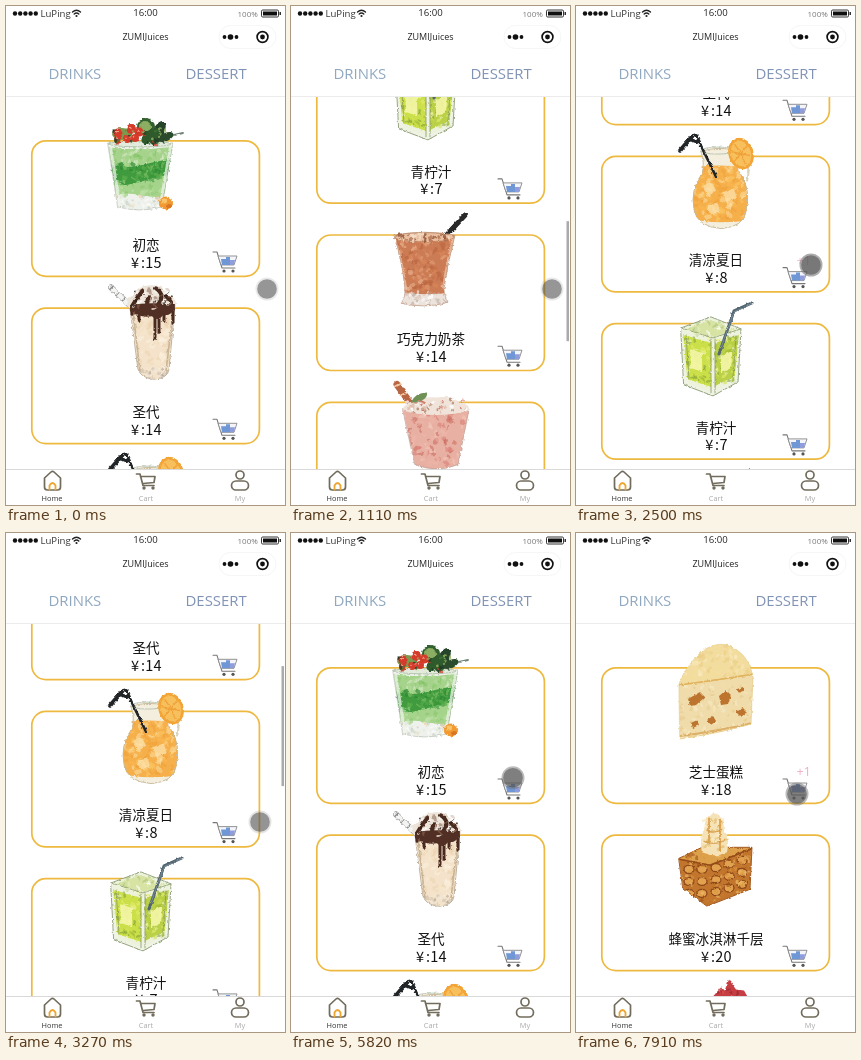
An HTML page that plays this animation: 279x499 px, repeating every 8 s.

```html
<!DOCTYPE html>
<html lang="zh">
<head>
<meta charset="utf-8">
<title>Drinks menu</title>
<style>
html, body { margin: 0; width: 100%; height: 100%; overflow: hidden; background: #fff; }
svg { display: block; width: 279px; height: 499px; }
text { font-family: "Open Sans", "Noto Sans CJK SC", "Noto Sans CJK", sans-serif; }
.name, .price { font-family: "Noto Sans CJK SC", "Noto Sans CJK", sans-serif; text-anchor: middle; fill: #111; }
.name { font-size: 13.6px; }
.price { font-size: 14.5px; letter-spacing: .3px; }
.yen { font-weight: 500; }
.tab { font-size: 14.9px; }
.label { font-size: 7.4px; text-anchor: middle; fill: #aaa; }
.icon { fill: none; stroke: #716c5c; stroke-width: 1.7; stroke-linejoin: round; stroke-linecap: round; }
</style>
</head>
<body>
<svg id="stage" viewBox="0 0 279 499"></svg>
<script>
const GAP = 167.3, TOP = 134, LOOP = 8000;

let seed = 7;
const rnd = () => (seed = (seed * 16807) % 2147483647) / 2147483647;
const between = (a, b) => a + (b - a) * rnd();

// drawing helpers
const shape = (d, fill, extra = '') => `<path d="${d}" fill="${fill}" ${extra}/>`;
const line = (d, color, width, extra = '') =>
  `<path d="${d}" fill="none" stroke="${color}" stroke-width="${width}" stroke-linecap="round" stroke-linejoin="round" ${extra}/>`;
const oval = (x, y, rx, ry, fill, extra = '') =>
  `<ellipse cx="${x}" cy="${y}" rx="${rx}" ry="${ry}" fill="${fill}" ${extra}/>`;
const clip = (id, d, inner) =>
  `<clipPath id="${id}"><path d="${d}"/></clipPath><g clip-path="url(#${id})">${inner}</g>`;
const dabs = (n, x, y, w, h, colors, r = 2, alpha = .55) => {
  let out = '';
  for (let i = 0; i < n; i++) {
    const cx = between(x, x + w).toFixed(1), cy = between(y, y + h).toFixed(1);
    out += oval(cx, cy, between(r * .5, r * 1.5).toFixed(1), between(r * .3, r).toFixed(1),
      colors[Math.floor(rnd() * colors.length)],
      `opacity="${alpha}" transform="rotate(${Math.floor(rnd() * 180)} ${cx} ${cy})"`);
  }
  return out;
};

// pictures: x on the stage, y from the top edge of the card
function greenSoda() {
  const glass = 'M102 3L167 3L156 67Q134 73 112 67Z';
  return line('M158 0L168 -5L177 -7', '#6f8578', 1.8) +
    clip('soda', glass,
      shape('M100 0H170V75H100Z', '#eff2ec') +
      shape('M100 7Q134 12 170 6V55Q150 59 134 55T100 57Z', '#a5d38b') +
      dabs(50, 104, 6, 60, 20, ['#b9dca0', '#7fbf61', '#dcebcf', '#8fc973'], 2.2) +
      shape('M100 23Q118 30 136 25T170 19V34Q150 36 134 42T100 43Z', '#3f9b3e') +
      dabs(55, 104, 24, 58, 16, ['#2b8433', '#5cae4d', '#37963a', '#80c267'], 2.4, .6) +
      dabs(40, 107, 41, 54, 14, ['#c4e3ad', '#8bc76c', '#a7d78c'], 2.4) +
      dabs(50, 110, 56, 48, 14, ['#fff', '#c5ccc2', '#e0e8da', '#f0c690'], 2) +
      line('M104 4L114 67M165 4L154 67', '#f0f5ec', 3, 'opacity=".75"')) +
    line(glass, '#a5b1a3', .8, 'opacity=".7"') +
    oval(134, 4, 31, 2.8, '#e3ecdc', 'stroke="#a9bba2" stroke-width=".8"') +
    oval(116, -6, 10, 6, '#7b9a4d') + oval(140, -13, 9, 9, '#33602f') + oval(139, -13, 6, 6, '#8bae62') +
    oval(152, -7, 6, 13, '#25442a', 'transform="rotate(25 152 -7)"') +
    oval(145, -4, 11, 6, '#2e5a2c', 'transform="rotate(-35 145 -4)"') +
    oval(160, -3, 8, 4, '#2b4b2d', 'transform="rotate(-25 160 -3)"') +
    [[112, -7, 4.5], [121, -1, 4], [125, -11, 5], [133, -8, 4.5], [129, -2, 4], [112, 0, 3.5]]
      .map(([x, y, r]) => oval(x, y, r, r, '#d43b2a') + oval(x - 1, y - 1.3, 1.2, 1, '#f4a08a')).join('') +
    dabs(34, 107, -12, 53, 17, ['#1c3a20', '#3e7936', '#9dbb6a', '#c93a2a'], 1.6, .75) +
    oval(160, 63, 7, 6.5, '#f19a32') + oval(158, 61, 3, 2.5, '#f9c56a') + oval(163, 66, 3, 2, '#dc7524');
}

function sundae() {
  const cup = 'M124 -2Q146 -8 169 -2L163 62Q162 71 148 72Q135 71 132 62Z';
  return line('M105 -20L126 0', '#a9a9a9', 6) + line('M105 -20L126 0', '#f4f4f2', 4.4) +
    line('M104 -18l3 -3M110 -12l3 -3M116 -6l3 -3', '#8d8d8d', 1.6) +
    clip('sundae', cup,
      shape('M120 -14H172V76H120Z', '#f4e3ca') +
      dabs(70, 126, 8, 41, 56, ['#fdf4e4', '#ebd2ad', '#f8e7cd', '#f0d9b8'], 3, .5) +
      dabs(24, 131, 61, 33, 11, ['#c7baa8', '#eee8df', '#a99d8d'], 2.2) +
      line('M127 4L134 64M167 4L160 64', '#c9b497', 1.6)) +
    line(cup, '#b3a48f', .8) +
    shape('M122 0Q119 -8 127 -12Q131 -22 144 -22Q157 -23 160 -14Q171 -10 170 0Q148 8 122 0Z', '#ede4da') +
    dabs(30, 126, -19, 39, 18, ['#c9baa8', '#fff', '#fff', '#8a6c57'], 2.4) +
    line('M137 -17Q131 -10 126 -1M150 -19Q160 -12 152 -3M143 -10Q138 -2 146 3M160 -11Q167 -5 167 2', '#4a2b20', 4) +
    line('M126 0V7M133 2V13M149 2V31M153 2V25M158 2V14M167 0V16', '#4a2a20', 3) +
    shape('M124 -2Q146 -6 169 -2Q167 9 157 8Q151 15 146 9Q134 11 124 4Z', '#512f24') +
    dabs(28, 126, -16, 40, 25, ['#30190f', '#7d5743', '#eee3d8'], 1.6, .8);
}

function orangePitcher() {
  const jug = 'M125 -4Q140 -10 160 -5Q158 10 165 19Q175 34 170 56Q168 71 145 73Q121 71 118 54Q114 34 126 18Q129 8 125 -4Z';
  return clip('jug', jug,
      shape('M112 -14H178V76H112Z', '#f3eedd') +
      shape('M112 13Q140 7 178 13V64Q146 70 112 63Z', '#f6b04b') +
      dabs(120, 117, 13, 55, 51, ['#fbc865', '#ef9f38', '#f9b853', '#fee1a4'], 2.8, .55) +
      shape('M126 31l9 -5 5 9 -8 6ZM146 37l12 -4 3 10 -11 3ZM131 50l11 -2 2 9 -10 2Z', '#fce2ab', 'opacity=".75"')) +
    line(jug, '#c6b796', .9) + oval(142, -5, 17, 3.5, 'none', 'stroke="#bec8b8"') +
    line('M160 5Q177 6 171 25', '#d9d3bd', 2) +
    oval(165, -2, 12.5, 16, '#f2a536', 'transform="rotate(-18 165 -2)"') +
    oval(165, -2, 10, 13, '#f8bf5d', 'transform="rotate(-18 165 -2)"') +
    line('M165 -2l-6 -9M165 -2l6 -8M165 -2l9 2M165 -2l4 10M165 -2l-7 8M165 -2l-10 -2', '#f0a239', 1.3) +
    line('M104 -5L116 -19', '#222527', 4.2) +
    line('M115 -18Q119 -24 123 -17Q121 -12 116 -15M122 -16L140 21', '#222527', 2.6);
}

function limeGlass() {
  const cube = 'M105 5L135 -6L165 6L162 59L137 73L108 62Z';
  return clip('lime', cube,
      shape('M100 -10H170V76H100Z', '#edf2dc') +
      shape('M107 12L135 20V64L111 56Z', '#cbdf49') +
      shape('M139 20L163 12L159 53L139 63Z', '#b9d047') +
      shape('M110 6L135 -3L160 7L137 14Z', '#d6e3a3') +
      dabs(110, 107, 14, 56, 45, ['#e6ee6e', '#a3bd36', '#d3e255', '#f4f7bf', '#83a238'], 2.2, .6) +
      dabs(30, 110, -3, 52, 15, ['#fff', '#a9c06f', '#e6efc2'], 2.2) +
      shape('M114 26L126 30V49L115 45ZM145 33L156 28L155 45L145 50Z', '#f6f7a8', 'opacity=".9"') +
      line('M105 7L110 60M165 8L160 58M137 15V71M108 61L137 71L162 58', '#f0f4e5', 3.4, 'opacity=".85"')) +
    line(cube, '#8c9b77', .9) + line('M105 5L137 15L165 6M135 16V70M139 16V70M110 12L113 56M160 13L157 54', '#869863', .8) +
    line('M143 31L158 -12L176 -20', '#536672', 3) + line('M145 25L158 -11L175 -19', '#8296a0', .8);
}

function chocolateTea() {
  const cup = 'M103 1Q134 -5 164 1Q157 28 153 54Q153 62 157 68Q134 75 110 69Q115 62 114 55Q111 26 103 1Z';
  return line('M151 5L175 -20', '#292929', 4) + line('M160 -4L174 -19', '#292929', 5) +
    clip('choco', cup,
      shape('M100 -5H168V76H100Z', '#cc7c55') +
      dabs(130, 104, 5, 59, 50, ['#e5a27a', '#b5603d', '#da875c', '#eebd9b', '#c46c43'], 2.6) +
      shape('M100 57Q135 63 168 57V76H100Z', '#ece3dc') +
      dabs(36, 111, 58, 47, 13, ['#fff', '#b9a99f', '#d8c0b1'], 2) +
      line('M104 5Q112 30 115 54M162 5Q155 30 152 54', '#efc9ae', 2, 'opacity=".7"')) +
    line(cup, '#c0a18d', .7) + oval(133.5, 3, 29.500, 4.5, '#eabf9f', 'stroke="#bd8967" stroke-width=".8"') +
    dabs(34, 108, 0, 50, 6, ['#ad6a48', '#f4dfca', '#85492f'], 2, .75);
}

function berryShake() {
  const cup = 'M112 8Q145 0 178 8L167 63Q146 72 124 63Z';
  return line('M106 -17L126 11', '#b76542', 7) + line('M104 -15l6 -3M110 -6l6 -3M117 4l6 -3', '#efc7a4', 2) +
    clip('berry', cup, shape('M108 -4H182V76H108Z', '#e7b0a2') +
      dabs(100, 114, 8, 60, 55, ['#f4cabe', '#d97b73', '#efb7aa', '#c9685c'], 2.6)) +
    line(cup, '#c2a298', .8) +
    shape('M112 9Q111 3 122 1Q131 -5 145 -4Q162 -6 168 1Q180 3 178 9Q145 18 112 9Z', '#f0e3d9') +
    dabs(44, 115, -2, 60, 13, ['#c85e4b', '#fff', '#ae8067', '#dfb7a6'], 1.8, .75) +
    shape('M120 1Q124 -9 136 -9Q137 0 120 1Z', '#6f9155');
}

function cheesecake() {
  const cake = 'M103 17Q108 1 126 -16Q140 -25 151 -22Q172 -15 177 9L175 57Q150 65 104 72Z';
  return clip('cheese', cake,
      shape('M100 -26H180V76H100Z', '#f2dc9e') +
      shape('M100 17Q136 13 180 6V76H100Z', '#f0dcaa') +
      dabs(110, 103, -22, 74, 32, ['#fbeec5', '#ecce86', '#f5e0a2'], 2.6, .5) +
      dabs(110, 103, 18, 74, 52, ['#f9edcc', '#e4c587', '#f3dfab'], 2.2, .5) +
      line('M103 18Q136 14 178 7', '#e0b45e', 1.6) + line('M104 69Q148 63 176 56', '#dcb068', 2) +
      shape('M112 32l12 -7 5 5 -9 8 -6 1ZM143 29l7 -6 5 5 -3 9 -7 1ZM131 53l6 -4 3 5 -5 4ZM160 45l7 -4 4 4 -6 5ZM115 56l6 -3 2 5 -6 3ZM161 22l6 -2 1 4 -5 2Z', '#bc742f')) +
    line(cake, '#e6c986', .6);
}

function honeyCake() {
  const cake = 'M103 24L126 13L176 13L174 55L131 72L107 54Z';
  return clip('honey', cake,
      shape('M100 8H180V76H100Z', '#c1752d') +
      shape('M102 24L126 12L178 12L134 30Z', '#dda14c') +
      [35, 47, 59].map(y => [113, 126, 140, 153, 166].map(x =>
        oval(x, y - Math.max(0, x - 134) * .28, 5, 4, '#e1a14f', 'stroke="#8b4717" stroke-width="1.3"')).join('')).join('') +
      dabs(110, 104, 14, 71, 56, ['#dd9a43', '#9b5017', '#f0be6a', '#cd7c2c'], 2, .6) +
      line('M103 25L134 31L177 14', '#934b18', 1.6)) +
    line(cake, '#a35b22', 1) +
    shape('M126 18Q123 4 128 -4Q129 -20 138 -21Q148 -20 148 -4Q154 4 151 18Q139 24 126 18Z', '#f5e2b6') +
    dabs(36, 128, -17, 20, 34, ['#fff4d7', '#dfb866', '#f9e8bf'], 2.2, .65) +
    line('M131 -4Q139 0 146 -5M128 7Q140 12 150 5', '#d9a657', 1.4) +
    line('M133 -16V8M144 -15V17', '#d8943b', 1.5);
}

function berryTart() {
  return shape('M136 -4L145 -14L149 -12L153 -22L160 -12L168 -11L172 -4L160 12H142Z', '#c63d42') +
    dabs(34, 142, -12, 24, 16, ['#ed7d7a', '#992a33', '#d5504f'], 1.8, .7) +
    oval(150, 30, 38, 27, '#eacb95');
}

const cart = line('M207 112H211L216 128H229', '#777', 1.1) +
  shape('M212 116H231L228 125H215Z', '#f3f5fb', 'stroke="#888" stroke-width=".9"') +
  shape('M215 119h5v6h-4ZM220 117h4v8h-4Z', '#6f97d6') + shape('M224 120h5l-1 5h-4Z', '#8f9ddd') +
  oval(218, 131, 1.6, 1.6, '#555') + oval(227, 131, 1.6, 1.6, '#555');

const card = ([art, name, price], i) => `<g transform="translate(0 ${TOP + GAP * i})">
  <rect x="25.8" y=".8" width="227.600" height="135.500" rx="14" fill="#fff" stroke="#eeb93f" stroke-width="1.7"/>
  <g filter="url(#paint)">${art()}</g>
  <text class="name" x="140" y="109.700">${name}</text>
  <text class="price" x="140.500" y="127.500"><tspan class="yen">¥</tspan><tspan dx="1.500">:${price}</tspan></text>${cart}</g>`;

const drinks = [[greenSoda, '初恋', 15], [sundae, '圣代', 14], [orangePitcher, '清凉夏日', 8],
  [limeGlass, '青柠汁', 7], [chocolateTea, '巧克力奶茶', 14], [berryShake, '草莓奶昔', 16]];
const desserts = [[cheesecake, '芝士蛋糕', 18], [honeyCake, '蜂蜜冰淇淋千层', 20], [berryTart, '草莓塔', 16]];

const statusBar = [9, 14.2, 19.4, 24.6, 29.8].map(x => oval(x, 7.5, 2.2, 2.2, '#111')).join('') +
  `<text x="34.5" y="10.5" font-size="9.6" fill="#333">LuPing</text>
  ${line('M66.5 6Q70.5 2.5 74.5 6M68.2 8Q70.5 6 72.8 8', '#222', 1.4)}${oval(70.5, 10, 1.1, 1.1, '#222')}
  <text x="139.500" y="10.300" font-size="9.600" text-anchor="middle" fill="#222">16:00</text>
  <text x="231.5" y="10.5" font-size="8" fill="#777">100%</text>
  <rect x="255.5" y="4" width="17" height="7" rx="1.2" fill="none" stroke="#333"/>
  <rect x="257" y="5.5" width="14" height="4" fill="#111"/><rect x="273.5" y="6" width="1.5" height="3" fill="#333"/>`;
const header = statusBar +
  `<text x="139.5" y="34" font-size="9" text-anchor="middle" fill="#222">ZUMIJuices</text>
  <rect x="213" y="19.5" width="57" height="23" rx="11.5" fill="#fff" stroke="#f6f6f6"/>
  ${oval(218.5, 31, 1.9, 1.9, '#111')}${oval(224.5, 31, 2.8, 2.8, '#111')}${oval(230.5, 31, 1.9, 1.9, '#111')}
  ${oval(256.5, 31, 5.4, 5.4, 'none', 'stroke="#111" stroke-width="1.7"')}${oval(256.5, 31, 2.4, 2.4, '#111')}
  <text class="tab" x="42.5" y="73" fill="#8fa8c0">DRINKS</text>
  <text class="tab" x="179.5" y="73" fill="#8093b5">DESSERT</text>${line('M0 90.5H279', '#ececec', 1)}`;
const footer = `${line('M0 463.5H279', '#d9d9d9', 1)}
  <path class="icon" d="M38.5 472L45 466Q46.5 464.6 48 466L54.5 472V481Q54.5 484 51.5 484H41.5Q38.5 484 38.5 481Z"/>
  ${line('M43.5 483.5V479.5Q46.5 474.5 49.5 479.5V483.5', '#eda52f', 1.8)}
  <path class="icon" d="M130.5 468H134L137 479.5H148M134.5 470.5H149L148 476.5L137 477.5"/>
  ${oval(138, 482, 1.7, 1.7, '#716c5c')}${oval(147, 482, 1.7, 1.7, '#716c5c')}
  <circle class="icon" cx="234" cy="469" r="4"/><rect class="icon" x="225.5" y="475" width="17" height="9" rx="4.5"/>
  <text class="label" x="46" y="495" style="fill:#333">Home</text><text class="label" x="140" y="495">Cart</text>
  <text class="label" x="234" y="495">My</text>`;

const $ = id => document.getElementById(id);
// the filter roughens edges like watercolour
$('stage').innerHTML = `<clipPath id="view"><rect y="91" width="279" height="372"/></clipPath>
  <filter id="paint" color-interpolation-filters="sRGB"><feTurbulence type="fractalNoise" baseFrequency=".3" numOctaves="2"/>
  <feDisplacementMap in="SourceGraphic" scale="3" xChannelSelector="R" yChannelSelector="G"/></filter>
  <g clip-path="url(#view)"><g id="drinks">${drinks.map(card).join('')}</g>
  <g id="desserts">${desserts.map(card).join('')}</g></g>
  ${header}${footer}
  <text id="plus" x="220.5" font-size="12.5" fill="#f2a3bd">+1</text>
  <rect id="bar" x="275.5" width="2.5" height="120" fill="#aaa"/>
  <g id="pointer">${oval(0, 0, 11.5, 11.5, '#777', 'id="ring"')}${oval(0, 0, 9.8, 9.8, '#444', 'opacity=".5"')}</g>`;

// the screen refreshes in bursts: [first, last, count]
const ticks = [0];
for (const [a, b, n] of [[220, 1010, 8], [1110, 1110, 1], [1310, 1550, 3], [1750, 2500, 8], [2600, 3040, 5],
  [3270, 3610, 4], [3930, 4490, 6], [4810, 4810, 1], [5360, 5360, 1], [5580, 6380, 8], [6600, 6600, 1],
  [6750, 6750, 1], [6920, 7040, 2], [7350, 7910, 6]])
  for (let i = 0; i < n; i++) ticks.push(n > 1 ? a + (b - a) * i / (n - 1) : a);

const scrollKeys = [[0, 0], [220, 14], [671, 525], [1010, 620], [1110, 575], [1310, 440], [1550, 319],
  [3040, 319], [3270, 291], [3610, 0]];
const pointerKeys = [[0, 261, 283], [1110, 261, 283], [1550, 241, 292], [2070, 222, 266], [2290, 222, 264],
  [2500, 235, 259], [3040, 254, 289], [3610, 254, 289], [3930, 235, 278], [4270, 223, 261], [5360, 223, 260],
  [5700, 229, 256], [5808, 222, 245], [6040, 212, 150], [6270, 208, 78], [6380, 208, 72], [7040, 208, 72],
  [7350, 208, 76], [7680, 219, 225], [7798, 221, 261]];
const barKeys = [[0, 0], [220, 1], [2070, 1], [2500, 0], [3040, 0], [3270, 1], [3930, 1], [4378, 0]];
const ringKeys = [[0, .16], [1110, .16], [1310, .6], [2500, .6], [2600, .2], [3610, .2], [3930, .5]];
// [start, end, card]
const added = [[2170, 3039, 2], [4480, 5355, 0], [7790, 8600, 0]];

function at(keys, t) {
  const i = keys.findIndex(k => k[0] > t);
  if (i < 0) return keys[keys.length - 1].slice(1);
  const a = keys[i - 1], b = keys[i], p = (t - a[0]) / (b[0] - a[0]);
  return a.slice(1).map((v, j) => v + (b[j + 1] - v) * p);
}

function draw(now) {
  const time = now % LOOP;
  const t = ticks.filter(k => k <= time).pop();
  const [scroll] = at(scrollKeys, t), [x, y] = at(pointerKeys, t);
  const sweet = t >= 6920;
  $('drinks').setAttribute('transform', `translate(0 ${-scroll})`);
  $('drinks').style.display = sweet ? 'none' : '';
  $('desserts').style.display = sweet ? '' : 'none';
  $('bar').setAttribute('y', 49 + scroll * .289);
  $('bar').setAttribute('opacity', at(barKeys, t)[0]);
  $('pointer').setAttribute('transform', `translate(${x} ${y})`);
  $('ring').setAttribute('opacity', at(ringKeys, t)[0]);
  const hit = added.find(([a, b]) => t >= a && t < b);
  $('plus').setAttribute('opacity', hit ? 1 - .6 * (t - hit[0]) / (hit[1] - hit[0]) : 0);
  if (hit) $('plus').setAttribute('y', TOP + GAP * hit[2] - scroll + 109);
}

const start = performance.now();
function loop() {
  draw(Math.max(0, performance.now() - start));
  requestAnimationFrame(loop);
}
loop();
</script>
</body>
</html>
```
